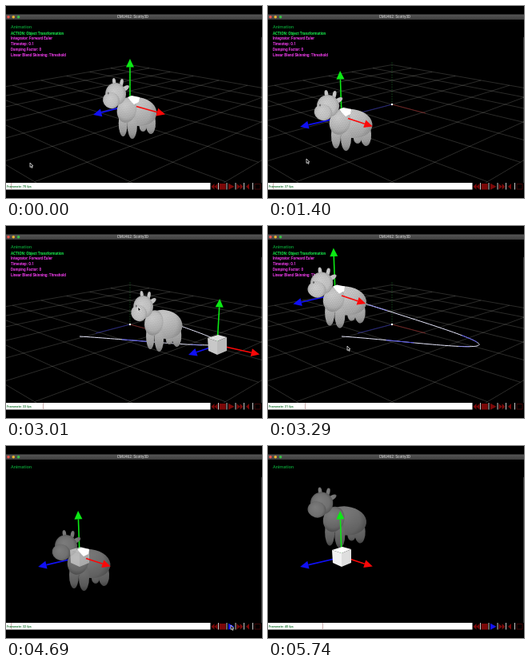
Recreate the animation shown at these times as an HTML page with a canvas. Size 320 px wide and 240 px high, loop 6300 ms.

```html
<!DOCTYPE html>
<html lang="en">
<head>
<meta charset="utf-8">
<title>Animation</title>
<style>
  html, body { margin: 0; width: 100%; height: 100%; overflow: hidden; background: #000; }
  svg, canvas { position: absolute; left: 0; top: 0; width: 320px; height: 240px; }
  text { font-family: Roboto, Arial, sans-serif; font-size: 4.65px; font-weight: 500; }
  #info { fill: #ee3cea; }
  #info text { font-weight: 700; }
  #info .action { fill: #18ea4c; }
  .mode { fill: #0a9c34; font-size: 5.7px; }
  .fps { fill: #0a6a22; font-size: 3.9px; }
</style>
</head>
<body>
<svg viewBox="0 0 320 240">
  <defs>
    <linearGradient id="bar" x2="0" y2="1">
      <stop stop-color="#565656"/><stop offset="1" stop-color="#3e3e3e"/>
    </linearGradient>
  </defs>
  <rect y="10.5" width="320" height="6.5" fill="url(#bar)"/>
  <rect x="319.300" y="39" width=".7" height="182" fill="#555"/>
  <circle cx="3" cy="13.8" r="1.8" fill="#f4564e"/>
  <circle cx="9.3" cy="13.8" r="1.8" fill="#efb32f"/>
  <circle cx="15.6" cy="13.8" r="1.8" fill="#38c148"/>
  <text x="158.5" y="15.4" text-anchor="middle" fill="#c4c4c4">CMU462: Scotty3D</text>
  <text class="mode" x="6" y="28">Animation</text>
  <g id="info">
    <text class="action" x="6" y="35.6">ACTION: Object Transformation</text>
    <text x="6" y="42.4">Integrator: Forward Euler</text>
    <text x="6" y="49.1">Timestep: 0.1</text>
    <text x="6" y="55.8">Damping Factor: 0</text>
    <text x="6" y="62.5">Linear Blend Skinning: Threshold</text>
  </g>
  <rect y="221" width="255.5" height="8.5" fill="#fff"/>
  <rect id="marker" y="221" width=".8" height="8.5" fill="#c09a9a"/>
  <text class="fps" id="fps" x="1" y="227.2"></text>
  <g fill="#7c0808">
    <path d="M260.500 222v7.500l-4-3.700zM264.500 222v7.500l-4-3.700zM266.700 222h8v7.500h-8zM288.500 222v7.500l4-3.700zM292.500 222v7.500l4-3.700zM304 222v7.500l-4-3.700z"/>
    <path id="play" d="M278 221.800v8l7.500-4z"/>
    <path d="M311 222.500h7v6.500h-7z" fill="none" stroke="#400606"/>
  </g>
  <path d="M265.500 221v8.500M276 221v8.500M287 221v8.500M297.500 221v8.500M308.500 221v8.500" stroke="#ddd" stroke-width=".9"/>
</svg>
<canvas id="view"></canvas>
<script>
const $ = id => document.getElementById(id);
const canvas = $('view'), ctx = canvas.getContext('2d');
const ratio = window.devicePixelRatio || 1;
canvas.width = 320 * ratio;
canvas.height = 240 * ratio;

const LOOP = 6300, STEP = 70;
const HOME = [155, 123], K1 = [92, 138], K2 = [264, 148], K3 = [84, 84.5];
const PICK2 = 1680, DROP2 = 2380, PICK3 = 2800, DROP3 = 3260;
const REWIND = 3710, PLAIN = 4270, PLAY = 4690, MOUSE_END = 5390;

const mix = (a, b, u) => a.map((v, i) => v + (b[i] - v) * u);

// Linear path through [time, x, y] stops
function track(t, stops) {
  const n = stops.findIndex(s => s[0] > t);
  if (n < 0) return stops[stops.length - 1].slice(1);
  if (n === 0) return stops[0].slice(1);
  const a = stops[n - 1], b = stops[n];
  return mix(a, b, (t - a[0]) / (b[0] - a[0])).slice(1);
}

const objectPath = [
  [770, ...HOME], [1240, ...K1], [PICK2, ...K1], [DROP2, ...K2],
  [PICK3, ...K2], [3010, 190, 114], [DROP3, ...K3], [REWIND - 1, ...K3], [REWIND, ...K1]
];
const mousePath = [
  [560, 30, 196], [770, 110, 133], [1240, 44, 150], [1400, 48, 191], [1540, 26, 225],
  [PICK2, 103, 132], [2100, 204, 139], [DROP2, 275, 142], [2600, 46, 225],
  [PICK3, 239, 137], [3010, 165, 101], [3220, 60, 74], [3290, 99, 150],
  [3640, 7, 225], [4060, 40, 205], [4500, 281, 224]
];

function line(points, color, width) {
  ctx.beginPath();
  points.forEach(p => ctx.lineTo(p[0], p[1]));
  ctx.strokeStyle = color;
  ctx.lineWidth = width;
  ctx.stroke();
}

function poly(points, color) {
  ctx.beginPath();
  points.forEach(p => ctx.lineTo(p[0], p[1]));
  ctx.fillStyle = color;
  ctx.fill();
}

// Ground plane seen along its diagonal
function project(x, z) {
  const u = (x - z) * Math.SQRT1_2, w = (x + z) * Math.SQRT1_2;
  const k = 500 / (500 - w * 0.96);
  return [HOME[0] + u * k, HOME[1] + w * 0.27 * k];
}

function drawGrid() {
  const cell = 50, n = 4, end = cell * n;
  for (let i = -n; i <= n; i++) {
    const c = i * cell;
    line([project(c, -end), project(c, end)], 'rgba(235,235,225,.3)', 0.6);
    line([project(-end, c), project(end, c)], 'rgba(235,235,225,.3)', 0.6);
  }
  line([HOME, [197, 134]], '#8c2020', 0.7);
  line([HOME, [112, 134]], '#2626a0', 0.7);
  ctx.setLineDash([1.5, 1.5]);
  line([HOME, [155, 70]], '#1c6428', 0.7);
  ctx.setLineDash([]);
  ctx.beginPath();
  ctx.arc(...HOME, 1.2, 0, 7);
  ctx.fillStyle = '#fff';
  ctx.fill();
}

// Smooth curve through the keys; s counts whole segments
function curve(keys, s) {
  const n = Math.min(Math.floor(s), keys.length - 2), t = s - n;
  const a = keys[n], b = keys[n + 1];
  const before = keys[n - 1], after = keys[n + 2];
  return a.map((p, i) => {
    const q = b[i];
    const m0 = before ? (q - before[i]) / 2 : q - p;
    const m1 = after ? (after[i] - p) / 2 : q - p;
    const t2 = t * t, t3 = t2 * t;
    return (2 * t3 - 3 * t2 + 1) * p + (t3 - 2 * t2 + t) * m0 + (3 * t2 - 2 * t3) * q + (t3 - t2) * m1;
  });
}

function drawCurve(keys) {
  const part = (from, to, color) => {
    const pts = [];
    for (let i = 0; i <= 40; i++) pts.push(curve(keys, from + (to - from) * i / 40));
    line(pts, color, 1);
  };
  for (let n = 0; n < keys.length - 1; n++) {
    part(n, n + 1, '#e6e6fa');
    part(n + (n ? 0.08 : 0.27), n + (n ? 0.26 : 0.42), '#3030dc');
    part(n + 0.7, n + 0.8, '#7878ec');
  }
}

function arrow(from, tip, color) {
  const dx = tip[0] - from[0], dy = tip[1] - from[1], len = Math.hypot(dx, dy);
  const ux = dx / len, uy = dy / len, bx = tip[0] - ux * 10.5, by = tip[1] - uy * 10.5;
  line([from, [bx, by]], color, 1.6);
  poly([tip, [bx - uy * 5, by + ux * 5], [bx + uy * 5, by - ux * 5]], color);
}

function drawAxes([x, y]) {
  const d = x - 155;
  arrow([x, y], [x + d * 0.03, y - 57], '#0ce814');
  arrow([x, y + 1], [x - 46 + d * 0.092, y + 13], '#1010f4');
}

function drawRed([x, y]) {
  arrow([x + 8, y + 2.5], [x + 44 + (x - 155) * 0.083, y + 12.5], '#fb0808');
}

function drawCube([x, y], bright) {
  const at = pts => pts.map(p => [x + p[0], y + p[1]]);
  const tones = bright ? ['#fff', '#f2f2f2', '#dedede'] : ['#dedede', '#c8c8c8', '#bababa'];
  poly(at([[-12, -8], [1, -12], [12, -9], [0, -4]]), tones[0]);
  poly(at([[-12, -8], [0, -4], [0, 13], [-11, 8]]), tones[1]);
  poly(at([[0, -4], [12, -9], [12, 8], [0, 13]]), tones[2]);
}

// x, y, rx, ry, tilt
const parts = [
  [20, 27, 5, 7, 0], [30, 22, 7, 15, -0.05], [13, 9, 25.5, 18, 0.12],
  [-7, 23, 6, 17, 0], [5.5, 26, 6.5, 17, 0], [-2, 7, 13, 16, 0.3],
  [-19, -28, 2.3, 5, -0.15], [-9, -27, 2.3, 5, 0.2], [-4, -20, 6, 2.8, -0.55],
  [-17, -13, 14, 14, 0.3], [-23, -5, 11.5, 10, 0.25]
];

function partPath([x, y, rx, ry, tilt]) {
  const p = new Path2D();
  p.ellipse(x, y, rx, ry, tilt, 0, 7);
  return p;
}

const cowPath = new Path2D();
parts.forEach(p => cowPath.addPath(partPath(p)));

function drawCow([x, y], plain) {
  const [hi, mid, low] = plain ? ['#7c7c7c', '#707070', '#545454'] : ['#e2e2e2', '#d4d4d4', '#acacac'];
  const d = x - 92;
  ctx.save();
  ctx.translate(x - 0.035 * d, y);
  ctx.scale(1 - 0.0012 * d, 1);
  parts.forEach(p => {
    const [px, py, rx, ry] = p, r = Math.max(rx, ry);
    const g = ctx.createRadialGradient(px - rx * 0.2, py - ry * 0.3, 0, px, py, r * 1.05);
    g.addColorStop(0, hi);
    g.addColorStop(0.7, mid);
    g.addColorStop(1, low);
    ctx.fillStyle = g;
    ctx.fill(partPath(p));
  });
  ctx.clip(cowPath);
  const shade = ctx.createLinearGradient(0, -20, 8, 44);
  shade.addColorStop(0.3, 'rgba(0,0,0,0)');
  shade.addColorStop(1, 'rgba(0,0,0,.25)');
  ctx.fillStyle = shade;
  ctx.fillRect(-50, -50, 100, 100);
  if (!plain) {
    for (let i = -100; i < 100; i += 2.2) {
      line([[i - 25, -50], [i + 25, 50]], 'rgba(30,30,30,.22)', 0.45);
      line([[i + 30, -50], [i - 30, 50]], 'rgba(30,30,30,.22)', 0.45);
      line([[-50, i], [50, i + 12]], 'rgba(30,30,30,.18)', 0.45);
    }
    ctx.beginPath();
    ctx.ellipse(-27, -14, 0.8, 1.6, 0, 0, 7);
    ctx.fillStyle = '#555';
    ctx.fill();
  }
  ctx.restore();
}

function drawPatch([x, y]) {
  poly([[x - 3, y - 9], [x + 2, y - 11], [x + 12, y - 9], [x + 11, y - 3], [x + 5, y], [x + 2, y - 3]], '#fff');
}

function drawMouse([x, y]) {
  const pts = [[0, 0], [0, 5.5], [1.3, 4.5], [2.2, 6.4], [3.1, 6], [2.3, 4.1], [3.9, 4], [0, 0]]
    .map(p => [x + p[0], y + p[1]]);
  poly(pts, '#111');
  line(pts, '#fff', 0.7);
}

function curveKeys(t, object) {
  if (t < PICK2) return null;
  if (t < DROP2) return [K1, object];
  if (t < PICK3) return [K1, K2];
  return t < DROP3 ? [K1, K2, object] : [K1, K2, K3];
}

function markerX(t) {
  if (t >= PLAY) return 6 + (t - PLAY) * 62 / 1050;
  if (t < 1540 || t >= REWIND) return 6;
  return t < 2600 ? 26 : 46;
}

function drawScene(t) {
  const plain = t >= PLAIN, playing = t > PLAY;
  let cow = track(t, objectPath), gizmo = cow;
  if (playing) {
    cow = curve([K1, K2, K3], Math.min(2, (t - PLAY) / 330));
    gizmo = K1;
  } else if (t > PICK2 && t < DROP2) gizmo = K1;
  else if (t > PICK3 && t < DROP3) gizmo = K2;

  if (!plain) {
    drawGrid();
    const keys = curveKeys(t, cow);
    if (keys) drawCurve(keys);
  }
  if (gizmo !== cow) {
    if (playing) drawCow(cow, true);
    drawAxes(gizmo);
    drawRed(gizmo);
    drawCube(gizmo, playing);
    if (!playing) drawCow(cow, false);
  } else {
    drawAxes(gizmo);
    drawCow(cow, plain);
    if (plain) {
      ctx.globalAlpha = 0.55;
      drawCube(gizmo, true);
      ctx.globalAlpha = 1;
    }
    drawPatch(gizmo);
    drawRed(gizmo);
  }
}

function fpsAt(t) {
  if (t < 560) return 70;
  if (t < 1820) return 37;
  if (t < 2660) return 32;
  if (t < 3080) return 33;
  if (t < REWIND) return 31;
  return t < 5040 ? 32 : 40;
}

function frame(now) {
  const t = Math.floor(now % LOOP / STEP) * STEP;
  ctx.setTransform(ratio, 0, 0, ratio, 0, 0);
  ctx.clearRect(0, 0, 320, 240);
  ctx.lineJoin = 'round';
  ctx.save();
  ctx.beginPath();
  ctx.rect(0, 17, 320, 204);
  ctx.clip();
  drawScene(t);
  ctx.restore();
  if (t < MOUSE_END) drawMouse(track(t, mousePath));
  $('info').style.display = t < PLAIN ? '' : 'none';
  $('marker').setAttribute('x', markerX(t));
  $('fps').textContent = `Framerate: ${fpsAt(t)} fps`;
  $('play').style.fill = t >= PLAY - STEP * 2 ? '#1414f0' : '';
}

const start = performance.now();
(function tick() {
  frame(performance.now() - start);
  requestAnimationFrame(tick);
})();
</script>
</body>
</html>
```
